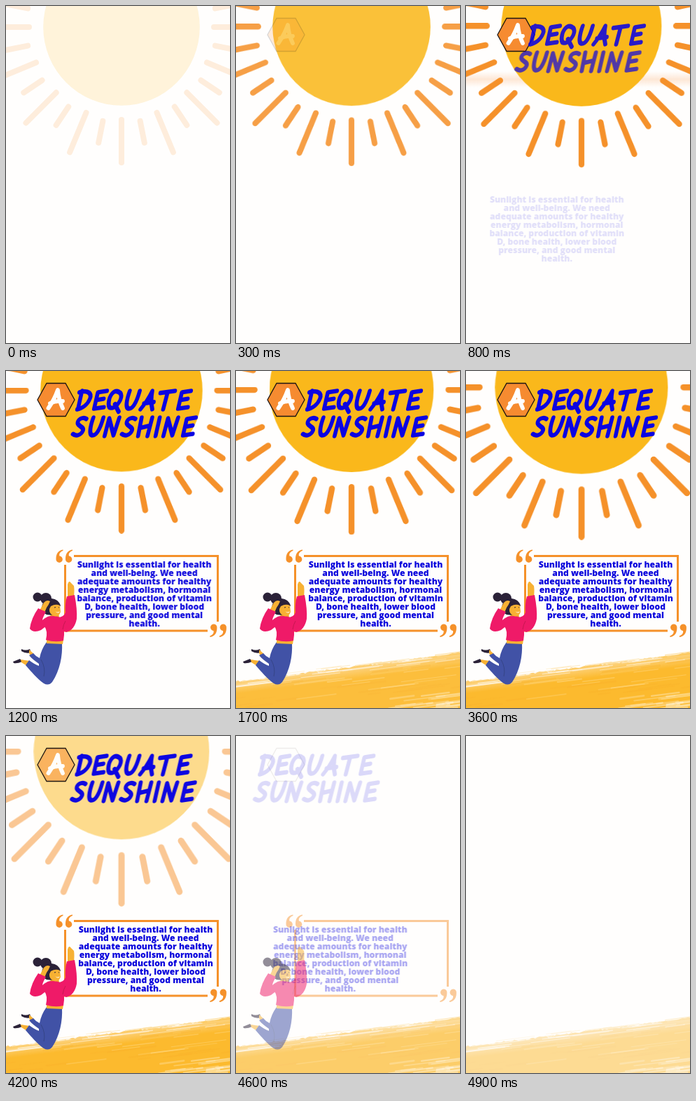
These frames come from a looping animation (320 by 480 pixels, 5000 ms). An HTML page:

```html
<!DOCTYPE html>
<html lang="en">
<head>
<meta charset="utf-8">
<title>Adequate Sunshine</title>
<style>
html, body { margin: 0; width: 100%; height: 100%; overflow: hidden; background: #fffefd; }
svg { display: block; width: 320px; height: 480px; }
.anim { animation: 5s cubic-bezier(.37, 0, .63, 1) infinite; }
#sun { animation-name: sun; }
#zoom { transform-origin: 165px 96px; animation: zoom 5s linear infinite; }
#band { animation-name: band; }
#hex { animation-name: hex; }
#fill { animation-name: fill; }
#line1 { animation-name: line1; }
#line2 { animation-name: line2; }
#copy { animation-name: copy; }
#frame { animation-name: frame; }
#woman { animation-name: woman; }
#brush { animation-name: brush; }
@keyframes sun {
  0% { opacity: .15; animation-timing-function: ease-out; }
  9%, 78% { opacity: 1; }
  90%, 100% { opacity: 0; }
}
@keyframes zoom { to { transform: scale(1.144); } }
@keyframes band { 0%, 12% { opacity: 0; } 16% { opacity: 1; } 20%, 100% { opacity: 0; } }
@keyframes hex { 0%, 3% { opacity: 0; } 14%, 83% { opacity: 1; } 94%, 100% { opacity: 0; } }
@keyframes fill { 0%, 80% { opacity: 1; } 88%, 100% { opacity: 0; } }
@keyframes line1 {
  0%, 6.8% { opacity: 0; transform: translateX(-80px); }
  18.8%, 83.4% { opacity: 1; transform: none; }
  95%, 100% { opacity: 0; transform: translateX(-80px); }
}
@keyframes line2 {
  0%, 8.4% { opacity: 0; transform: translateX(-80px); }
  20.4%, 83% { opacity: 1; transform: none; }
  95%, 100% { opacity: 0; transform: translateX(-80px); }
}
@keyframes copy {
  0%, 13.2% { opacity: 0; transform: translateX(-80px); }
  25.2%, 85% { opacity: 1; transform: none; }
  97%, 100% { opacity: 0; transform: translateX(-80px); }
}
@keyframes frame { 0%, 16% { opacity: 0; } 24%, 86% { opacity: 1; } 97.6%, 100% { opacity: 0; } }
@keyframes woman { 0%, 16% { opacity: 0; } 24%, 86.4% { opacity: 1; } 97.8%, 100% { opacity: 0; } }
@keyframes brush { 0%, 24.5% { opacity: 0; } 36%, 87% { opacity: 1; } 96%, 100% { opacity: .51; } }
.title { fill: none; stroke: #0b04e2; stroke-width: 6.8; stroke-linecap: round; stroke-linejoin: round; }
#copy { font: 800 12.15px "Open Sans", "Noto Sans", sans-serif; fill: #0b06dd; text-anchor: middle; }
</style>
</head>
<body>
<svg viewBox="0 0 320 480">
  <defs>
    <linearGradient id="glow" x1="0" y1="0" x2="0" y2="1">
      <stop offset="0" stop-color="#f9a05a" stop-opacity="0"/>
      <stop offset=".5" stop-color="#f9a05a" stop-opacity=".24"/>
      <stop offset="1" stop-color="#f9a05a" stop-opacity="0"/>
    </linearGradient>
    <linearGradient id="wash" gradientUnits="userSpaceOnUse" x1="160" y1="420" x2="163" y2="444">
      <stop offset="0" stop-color="#fdd68a"/>
      <stop offset=".8" stop-color="#fcba2e"/>
    </linearGradient>
    <filter id="soft"><feGaussianBlur stdDeviation=".6"/></filter>
    <path id="quote" d="M10 0C3 1 0 6 0 13A4.700 4.700 0 1 0 5 9C4 6 6 3 10 1.600Z"/>
  </defs>

  <rect id="band" class="anim" y="93" width="320" height="23" fill="url(#glow)"/>
  <g id="sun" class="anim">
    <g id="zoom">
      <circle cx="165" cy="30" r="111.8" fill="#fab81b"/>
      <g id="rays" stroke="#f5912a" stroke-width="8" stroke-linecap="round"/>
    </g>
  </g>

  <g id="brush" class="anim">
    <path id="paint" fill="url(#wash)"/>
    <g id="streaks" fill="none" stroke-linecap="round" filter="url(#soft)"/>
  </g>

  <g id="hex" class="anim">
    <path id="fill" class="anim" d="M45 41L58 17.5H85L98 41L85 64.5H58Z" fill="#f68b30"/>
    <path d="M45 41L58 17.5H85L98 41L85 64.5H58Z" fill="none" stroke="#1c1512" stroke-width="1.3"/>
    <path d="M60.500 53Q69 41 74 27Q75 40 81 53M63 46Q71 42 81 43" fill="none" stroke="#fff" stroke-width="5.800" stroke-linecap="round" stroke-linejoin="round"/>
  </g>
  <g id="line1" class="anim"><g class="title" role="img" aria-label="DEQUATE"></g></g>
  <g id="line2" class="anim"><g class="title" role="img" aria-label="SUNSHINE"></g></g>

  <g id="frame" class="anim" fill="#f5912a">
    <path d="M97 263.5H302.5V357M84.5 276V370H288" fill="none" stroke="#f5912a" stroke-width="3"/>
    <use href="#quote" x="71.5" y="254.5"/>
    <use href="#quote" x="85" y="254.5"/>
    <g transform="rotate(180 193.2 316.7)">
      <use href="#quote" x="71.5" y="254.5"/>
      <use href="#quote" x="85" y="254.5"/>
    </g>
  </g>
  <g id="copy" class="anim"></g>

  <g id="woman" class="anim">
    <g fill="#2b2238">
      <path d="M22 396Q28 399 34 396L36 401Q28 403 22 399Z"/>
      <path d="M10 414L20 410L23 414Q16 417 11 416Z"/>
    </g>
    <path d="M33 397L40 403L36 408L33 402ZM21 411L34 413L30 420L22 415Z" fill="#f7b133"/>
    <path d="M58 386L80 388C81 405 77 427 66 443Q61 449 54 445C44 438 36 428 28 419L33 412Q41 418 47 420L47 417C42 413 37 410 33 405L39 402Q43 407 48 409Q50 397 58 386Z" fill="#4152a6"/>
    <path d="M50 411Q57 423 54 435" fill="none" stroke="#33427f" stroke-width=".8"/>
    <path d="M58 382L82 383L81 389L58 388Z" fill="#f7b133"/>
    <path d="M88 322V304Q90 297 93 302L97 306Q98 312 97 321Z" fill="#f7b133"/>
    <path d="M64 340H75L76 354H63Z" fill="#f0a428"/>
    <path d="M59 350Q70 347 80 352Q85 368 82 384Q70 387 57 383Q60 370 55 364Z" fill="#ef1a68"/>
    <path d="M74 351Q82 351 85 344Q84 332 87 321L98 319Q102 340 101 353Q98 369 86 372Q80 370 78 364Z" fill="#ef1a68"/>
    <path d="M81 368Q82 361 85 356" fill="none" stroke="#bd174b" stroke-width=".8"/>
    <g fill="#2b2238">
      <circle cx="45" cy="322" r="6.5"/>
      <circle cx="57" cy="324" r="8"/>
      <path d="M51 338Q52 324 65 324Q75 325 78 334L68 347Q53 350 51 338Z"/>
    </g>
    <path d="M64 335Q71 331 77 334L78 343Q76 350 69 349Q61 346 62 339Z" fill="#f7b133"/>
    <path d="M70 342Q74 345 77 342Q75 347 70 342Z" fill="#fff"/>
    <path d="M69 337L71 336.5M75 337L76 336.600" stroke="#2b2238"/>
    <path d="M48 341L54 330Q58 325 63 328Q61 333 58 337L55 344Z" fill="#f7b133"/>
    <path d="M68 352Q60 362 50 369Q39 374 34 367Q36 352 46 338L57 343Q52 352 52 355Q57 350 64 349Z" fill="#ef1a68"/>
  </g>
</svg>
<script>
const $ = id => document.getElementById(id);

function add(parent, tag, attrs, text = "") {
  const el = document.createElementNS("http://www.w3.org/2000/svg", tag);
  for (const key in attrs) el.setAttribute(key, attrs[key]);
  el.textContent = text;
  parent.append(el);
}

// Sun rays, alternating long and short
for (let i = 0; i < 32; i++) {
  const [from, to] = i % 2 ? [136.5, 168] : [132, 193];
  add($("rays"), "path", { d: `M${from} 0H${to}`, transform: `translate(165 30) rotate(${i * 11.25})` });
}

// Brush lettering on a 20 x 30 cell
const glyphs = {
  D: "M3 1L2 29M-1 3C13 -1 21 5 19 13C17 22 9 28 1 29",
  E: "M18 1L3 3L2 28L18 26M3 15L15 13",
  Q: "M14 2C5 -1 0 8 1 18C2 30 11 29 17 21C23 12 21 3 12 2M12 21L21 33",
  U: "M2 1C0 12 -1 28 7 28C15 28 18 12 19 1",
  A: "M-1 29Q8 16 13 1Q13 16 19 29M3 20L19 18",
  T: "M-1 4L23 1M11 3L9 29",
  S: "M18 3C11 -1 2 4 5 10C8 15 17 15 16 21C14 28 6 30 0 26",
  N: "M1 29L3 2L16 28L20 1",
  H: "M2 1L2 29M20 1L18 29M2 17L19 13",
  I: "M3 1L2 29"
};

function letter(id, base, xs) {
  const group = $(id).firstElementChild;
  [...group.getAttribute("aria-label")].forEach((ch, i) => add(group, "path", {
    d: glyphs[ch],
    transform: `translate(${xs[i]} ${base}) skewX(-11) scale(.84 .93) translate(0 -29)`
  }));
}
letter("line1", 54.5, [101, 124, 144, 170, 193, 217, 244]);
letter("line2", 92.5, [95, 118, 140, 165, 187, 212, 224, 251]);

[
  "Sunlight is essential for health",
  "and well-being. We need",
  "adequate amounts for healthy",
  "energy metabolism, hormonal",
  "balance, production of vitamin",
  "D, bone health, lower blood",
  "pressure, and good mental",
  "health."
].forEach((line, i) => add($("copy"), "text", { x: 199.5, y: 280.3 + i * 12 }, line));

// Dry paint stroke with a ragged upper edge
let seed = 7;
const rand = () => (seed = seed * 16807 % 2147483647) / 2147483647;
const slope = -.127;
const edge = x => 442 + x * slope;

let outline = "M0 480V442";
for (let x = 3; x <= 324; x += 3) outline += `L${x} ${(edge(x) + rand() * 3 - 1).toFixed(1)}`;
$("paint").setAttribute("d", outline + "V480Z");

// Streaks run along the stroke, starting right of `left` and `near` to `near + depth` below its edge
function streaks({ count, color, near, depth, width, alpha, left = -30 }) {
  for (let i = 0; i < count; i++) {
    const x = left + rand() * (320 - left), len = 15 + rand() * 65;
    const y = edge(x) + near + rand() * depth;
    add($("streaks"), "path", {
      d: `M${x.toFixed(1)} ${y.toFixed(1)}l${len.toFixed(1)} ${(len * slope).toFixed(1)}`,
      stroke: color,
      "stroke-width": (width * (.4 + rand() * .6)).toFixed(2),
      opacity: (alpha * (.4 + rand() * .6)).toFixed(2)
    });
  }
}
streaks({ count: 26, color: "#fffaf0", near: 0, depth: 9, width: 2, alpha: .6 });
streaks({ count: 18, color: "#fcc24a", near: -3, depth: 5, width: 1.4, alpha: .6 });
streaks({ count: 24, color: "#f8b02a", near: 10, depth: 40, width: 3, alpha: .4 });
streaks({ count: 14, color: "#fedc90", near: 10, depth: 30, width: 2, alpha: .5 });
streaks({ count: 24, color: "#fff3d6", near: 52, depth: 28, width: 3, alpha: .6, left: 215 });
</script>
</body>
</html>
```
